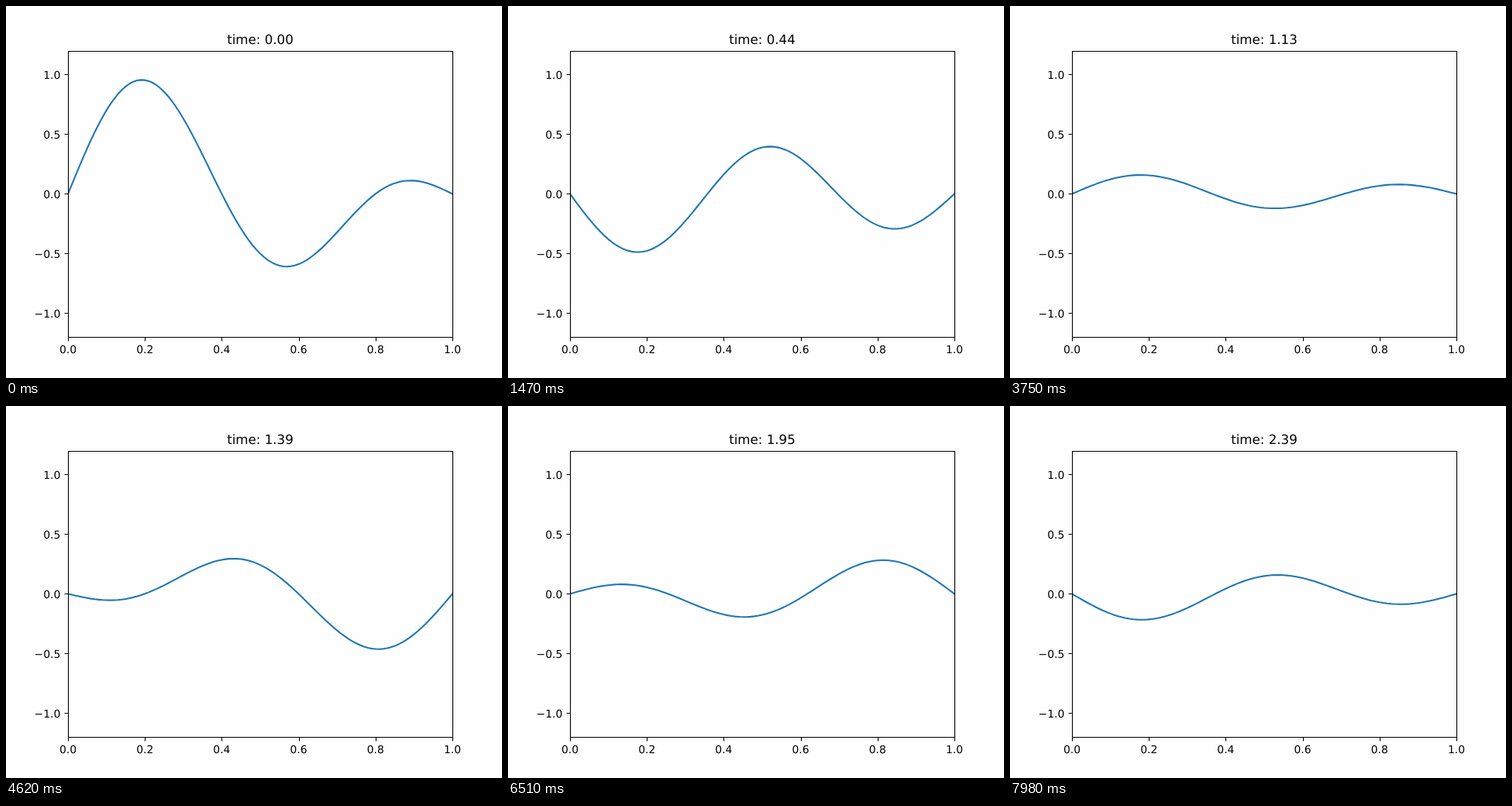
Animation, 640 px wide and 480 px high, one loop 8 s. Source, as an HTML page:

```html
<!DOCTYPE html>
<html lang="en">
<head>
<meta charset="utf-8">
<title>Damped string</title>
<style>
  html, body { margin: 0; width: 100%; height: 100%; overflow: hidden; background: #fefefe; }
  svg { display: block; width: 640px; height: 480px; }
  text { font: 13.89px "DejaVu Sans", sans-serif; fill: #000; text-rendering: geometricPrecision; }
  #title { font-size: 16.67px; }
  #axes { fill: none; stroke: #000; stroke-width: 1.11; }
  #wave { fill: none; stroke: #1f77b4; stroke-width: 2.08; stroke-linejoin: round; stroke-linecap: square; }
</style>
</head>
<body>
<svg viewBox="0 0 640 480">
  <clipPath id="plot"><rect x="80" y="58" width="496" height="369"/></clipPath>
  <path id="wave" clip-path="url(#plot)"/>
  <path id="axes"/>
  <g id="labels"></g>
  <text id="title" x="328" y="49" text-anchor="middle"></text>
</svg>
<script>
const LOOP = 8000, STEP = 30, DT = 0.009;
const GAMMA = 0.5, SPEED = Math.SQRT1_2;
const LEFT = 80, WIDTH = 496, ZERO = 242.4, UNIT = 154;

const el = id => document.getElementById(id);
const px = x => LEFT + WIDTH * x;
const py = y => ZERO - UNIT * y;
const snap = v => Math.floor(v + 0.5) + 0.5;

function addLabel(str, x, y, anchor) {
  const t = document.createElementNS("http://www.w3.org/2000/svg", "text");
  t.setAttribute("x", x);
  t.setAttribute("y", y);
  t.setAttribute("text-anchor", anchor);
  t.textContent = str;
  el("labels").append(t);
}

function drawAxes() {
  let d = "M80.5 58.5H576.5V427.5H80.5Z";
  for (let i = 0; i <= 5; i++) {
    const x = px(i / 5);
    d += `M${snap(x)} 427.5v5`;
    addLabel((i / 5).toFixed(1), x, 448, "middle");
  }
  for (let i = -2; i <= 2; i++) {
    const y = py(i / 2);
    d += `M80.5 ${snap(y)}h-5`;
    addLabel((i / 2).toFixed(1).replace("-", "\u2212"), 70.3, Math.round(y + 5.6), "end");
  }
  el("axes").setAttribute("d", d);
}

// Amplitude of the k-th standing wave; the velocity vanishes half a step before t = 0.
function amplitude(k, t) {
  const w = Math.sqrt((k * Math.PI * SPEED) ** 2 - GAMMA ** 2);
  const phase = w * (t + DT / 2);
  return 0.5 * Math.exp(-GAMMA * t) * (Math.cos(phase) + GAMMA / w * Math.sin(phase));
}

function render(ms) {
  const t = Math.floor(ms / STEP) * DT;
  const a2 = amplitude(2, t), a3 = amplitude(3, t);
  const points = [];
  for (let i = 0; i <= 100; i++) {
    const x = i / 100;
    const y = a2 * Math.sin(2 * Math.PI * x) + a3 * Math.sin(3 * Math.PI * x);
    points.push(`${px(x).toFixed(2)} ${py(y).toFixed(2)}`);
  }
  el("wave").setAttribute("d", "M" + points.join("L"));
  el("title").textContent = "time: " + (t + 1e-9).toFixed(2);
}

drawAxes();
render(0);
const start = performance.now();
requestAnimationFrame(function tick() {
  render((performance.now() - start) % LOOP);
  requestAnimationFrame(tick);
});
</script>
</body>
</html>
```
